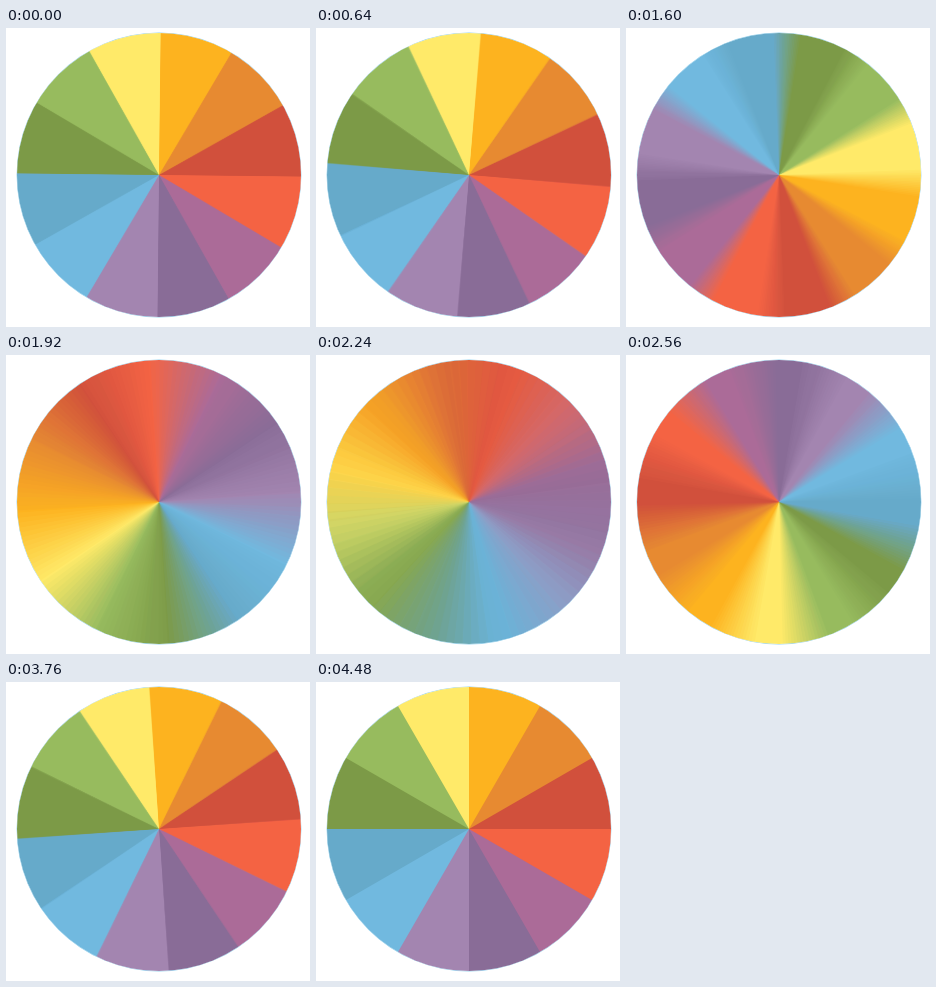
These frames come from a looping animation (304x299 px, 4640 ms). An HTML page with a canvas:

```html
<!DOCTYPE html>
<html lang="en">
<head>
<meta charset="utf-8">
<title>Spinning colour wheel</title>
<style>
  html, body { margin: 0; width: 100%; height: 100%; overflow: hidden; background: #fff; }
  canvas {
    position: absolute; left: 11px; top: 5px; width: 284px; height: 284px;
    border-radius: 50%; box-shadow: 0 0 0 .4px #8fd0ee;
  }
</style>
</head>
<body>
<canvas id="view" width="284" height="284"></canvas>
<script>
const COLORS = ['#fdb31f', '#e78a31', '#d1503c', '#f46343', '#ab6b98', '#896c97',
                '#a385b0', '#71b9df', '#66aaca', '#7c9a47', '#97bb5e', '#ffea69'];
const STEP = 80, LAST = 56, LOOP = 4640;
const TURNS = 3, SHUTTER = 0.5, SAMPLES = 16;
const SCALE = 2, RADIUS = 150, CENTER = 142;

// The wheel is drawn once, oversized, and then stamped at many angles.
function makeWheel() {
  const canvas = document.createElement('canvas');
  const r = RADIUS * SCALE;
  canvas.width = canvas.height = 2 * r;
  const c = canvas.getContext('2d');
  c.translate(r, r);
  c.rotate(-Math.PI / 2);
  const wedge = 2 * Math.PI / COLORS.length;
  COLORS.forEach((color, i) => {
    c.fillStyle = color;
    c.beginPath();
    c.moveTo(0, 0);
    // Each wedge runs on under the following ones, so no seams show.
    c.arc(0, 0, r, i * wedge, 2 * Math.PI);
    c.fill();
  });
  return canvas;
}

function easeInOutExpo(x) {
  if (x >= 1) return 1;
  return x < 0.5 ? 2 ** (20 * x - 10) / 2 : 1 - 2 ** (10 - 20 * x) / 2;
}

const wheel = makeWheel();
const ctx = document.getElementById('view').getContext('2d');
ctx.imageSmoothingQuality = 'high';
let shown = -1;

// Motion blur: a running average of the wheel over the open shutter.
function draw(step) {
  for (let k = 0; k < SAMPLES; k++) {
    const time = step + 0.9 + SHUTTER * ((k + 0.5) / SAMPLES - 0.5);
    ctx.save();
    ctx.globalAlpha = 1 / (k + 1);
    ctx.translate(CENTER, CENTER);
    ctx.rotate(2 * Math.PI * TURNS * easeInOutExpo(time / LAST));
    ctx.drawImage(wheel, -RADIUS, -RADIUS, 2 * RADIUS, 2 * RADIUS);
    ctx.restore();
  }
}

const start = performance.now();
function tick() {
  const t = (performance.now() - start) % LOOP;
  const step = Math.min(LAST, Math.floor(t / STEP));
  if (step !== shown) draw(shown = step);
  requestAnimationFrame(tick);
}
tick();
</script>
</body>
</html>
```
